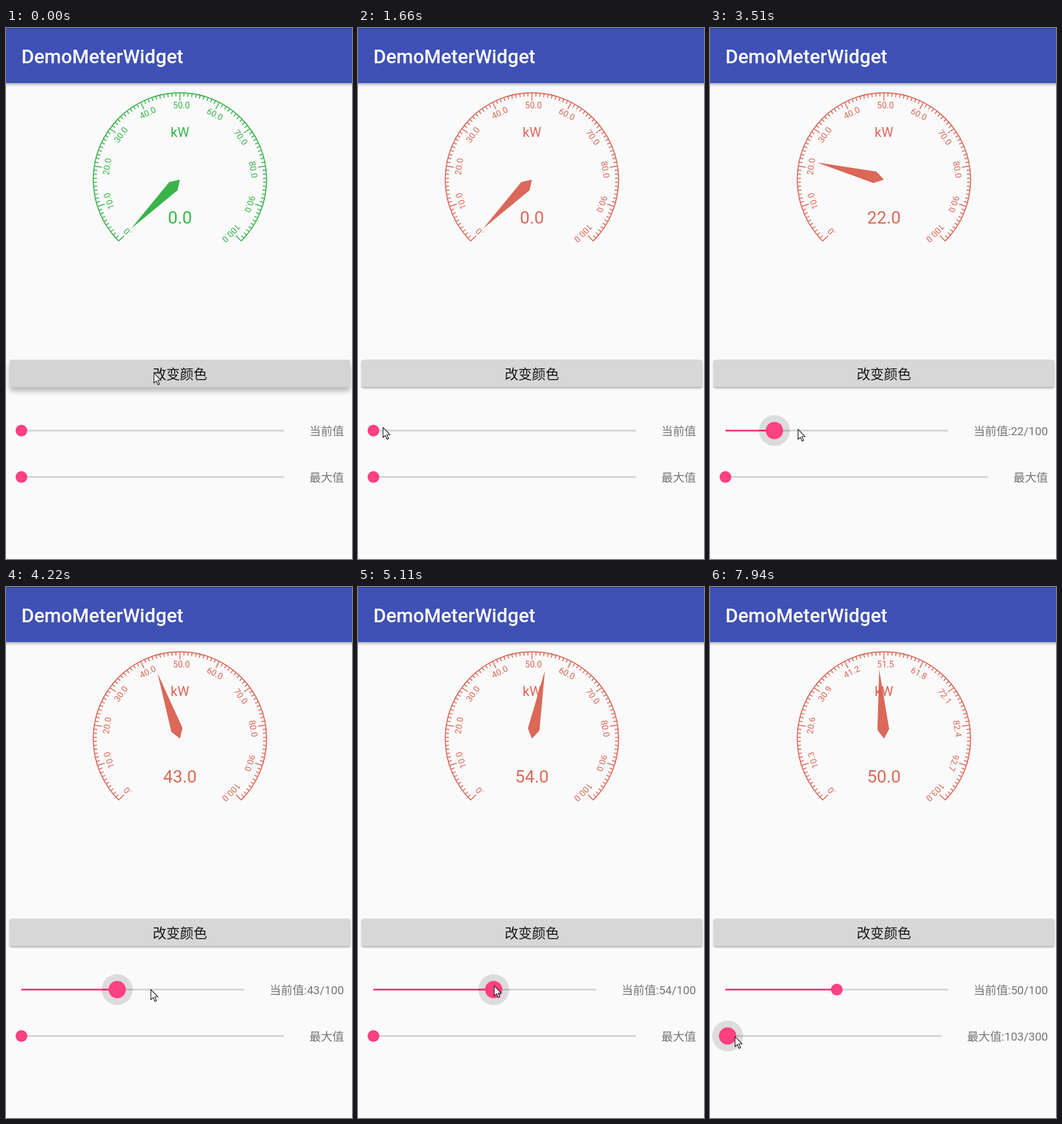
An HTML page with a canvas for the animation above (8 s loop, 560x858 px).

```html
<!DOCTYPE html>
<html lang="zh-CN">
<head>
<meta charset="utf-8">
<style>
html, body { margin: 0; overflow: hidden; background: #fafafa; }
canvas { display: block; }
</style>
</head>
<body>
<canvas id="stage" width="560" height="858"></canvas>
<script>
const ctx = document.getElementById('stage').getContext('2d');
const LOOP = 8000, TICK = 139.3, LEAD = 16, RAD = Math.PI / 180;
const FONT = 'Roboto, "Noto Sans CJK SC", "Noto Sans CJK", sans-serif';
const PINK = '#ff4081';

// Ticks at which things happen
const RELEASE_BUTTON = 1, GRAB_VALUE = 17, DROP_VALUE = 44, GRAB_MAX = 54;

// Turning points: tick, then position or value
const pointerPath = [[3, 239, 557], [10, 66, 640], [12, 40, 645], [14, 28, 646],
  [17, 36, 646], [21, 68, 647], [30, 234, 650], [36, 220, 644], [44, 205, 645],
  [46, 150, 790], [49, 39, 734], [52, 31, 726], [57, 40, 726]];
const valuePath = [[17, 3], [21, 6], [30, 43], [34, 56], [36, 54], [40, 50]];

const clamp = (v, low, high) => Math.max(low, Math.min(high, v));

// Straight runs between turning points, resting at both ends
function along(path, tick) {
  const next = path.findIndex(point => point[0] > tick);
  if (next < 1) return path.at(next).slice(1);
  const a = path[next - 1], b = path[next], f = (tick - a[0]) / (b[0] - a[0]);
  return a.slice(1).map((v, i) => Math.round(v + (b[i + 1] - v) * f));
}

function text(str, x, y, size, color, align = 'center', weight = 400) {
  ctx.font = `${weight} ${size}px ${FONT}`;
  ctx.textAlign = align;
  ctx.fillStyle = color;
  ctx.fillText(str, x, y);
}

function line(x1, y1, x2, y2, color, width) {
  ctx.strokeStyle = color;
  ctx.lineWidth = width;
  ctx.beginPath();
  ctx.moveTo(x1, y1);
  ctx.lineTo(x2, y2);
  ctx.stroke();
}

function disc(x, y, r, color) {
  ctx.fillStyle = color;
  ctx.beginPath();
  ctx.arc(x, y, r, 0, 7);
  ctx.fill();
}

function polygon(...points) {
  ctx.beginPath();
  points.forEach(p => ctx.lineTo(...p));
  ctx.closePath();
  ctx.fill();
}

function box(x, y, w, h, r, color, shadow, blur, drop) {
  ctx.save();
  ctx.shadowColor = `rgba(0,0,0,${shadow})`;
  ctx.shadowBlur = blur;
  ctx.shadowOffsetY = drop;
  ctx.fillStyle = color;
  ctx.beginPath();
  ctx.roundRect(x, y, w, h, r);
  ctx.fill();
  ctx.restore();
}

function header() {
  box(-10, -10, 580, 99, 0, '#3f51b5', 0.35, 5, 2);
  ctx.fillStyle = '#303f9f';
  ctx.fillRect(0, 0, 560, 1.5);
  text('DemoMeterWidget', 25, 57, 31.2, '#fff', 'left', 500);
}

function gauge(value, max, color) {
  ctx.save();
  ctx.translate(281.5, 245);
  ctx.strokeStyle = color;
  ctx.lineWidth = 1.7;
  ctx.beginPath();
  ctx.arc(0, 0, 140.3, 135 * RAD, 405 * RAD);
  ctx.stroke();
  for (let i = 0; i <= 100; i++) {
    ctx.save();
    ctx.rotate((i * 2.7 - 135) * RAD);
    const major = i % 10 === 0;
    line(0, -140.5, 0, major ? -128 : -134.5, color, 1.5);
    if (major) {
      const label = i ? (max * i / 100).toFixed(1) : '.0';
      text(label, Math.min(i, 2.5), -115, 14, color);
    }
    ctx.restore();
  }
  text('kW', 0, -69.5, 21.6, color);
  text(value.toFixed(1), 0, 71, 28, color);
  ctx.rotate((value / max * 270 - 135) * RAD);
  polygon([0, 0], [-9.5, -15], [0, -112], [9.5, -15]);
  ctx.restore();
}

function button(pressed, dim) {
  const shade = Math.round(214 - (pressed ? 3 : 13 * dim));
  const shadow = pressed ? [0.28, 9, 6] : [0.36, 3, 1.5];
  box(6, 536, 551, 44.5, 3, `rgb(${shade},${shade + 1},${shade})`, ...shadow);
  text('改变颜色', 281.5, 567, 22, '#161616');
}

function slider(y, fraction, label, pressed) {
  text(label, 547, y + 7, 18.67, '#757575', 'right');
  const end = 506 - ctx.measureText(label).width;
  const x = 25 + fraction * (end - 25);
  line(25, y, end, y, '#d5d5d5', 3);
  line(25, y, x, y, PINK, 3);
  if (pressed) disc(x, y, 25, 'rgba(0,0,0,.12)');
  disc(x, y, pressed ? 14 : 9.5, PINK);
}

function pointer(x, y) {
  ctx.save();
  ctx.translate(x + 0.5, y + 0.5);
  ctx.fillStyle = '#fff';
  polygon([0, 0], [0, 16], [3.8, 12.8], [6.5, 19], [9, 18], [6.3, 11.8], [11.3, 11.5]);
  ctx.strokeStyle = '#15151f';
  ctx.lineWidth = 1.1;
  ctx.stroke();
  ctx.restore();
}

function draw(tick) {
  const pressed = tick < RELEASE_BUTTON;
  const value = tick < GRAB_VALUE ? 0 : along(valuePath, tick)[0];
  const extra = clamp(Math.round((tick - GRAB_MAX + 1) * 0.75), 0, 3);
  const max = 100 + extra;
  const dim = clamp(Math.min(tick - DROP_VALUE + 1, GRAB_MAX + 1 - tick) / 3, 0, 1);

  ctx.fillStyle = '#fafafa';
  ctx.fillRect(0, 0, 560, 858);
  header();
  gauge(value, max, pressed ? '#38b44a' : '#db6858');
  button(pressed, dim);
  slider(650.5, value / 100, '当前值' + (value ? `:${value}/100` : ''),
    tick >= GRAB_VALUE && tick < DROP_VALUE);
  slider(725.5, extra / 300, '最大值' + (extra ? `:${max}/300` : ''), tick >= GRAB_MAX);
  pointer(...along(pointerPath, tick));
}

// The screen refreshes in even ticks
function frame() {
  draw(Math.floor((performance.now() % LOOP + LEAD) / TICK));
  requestAnimationFrame(frame);
}
frame();
</script>
</body>
</html>
```
